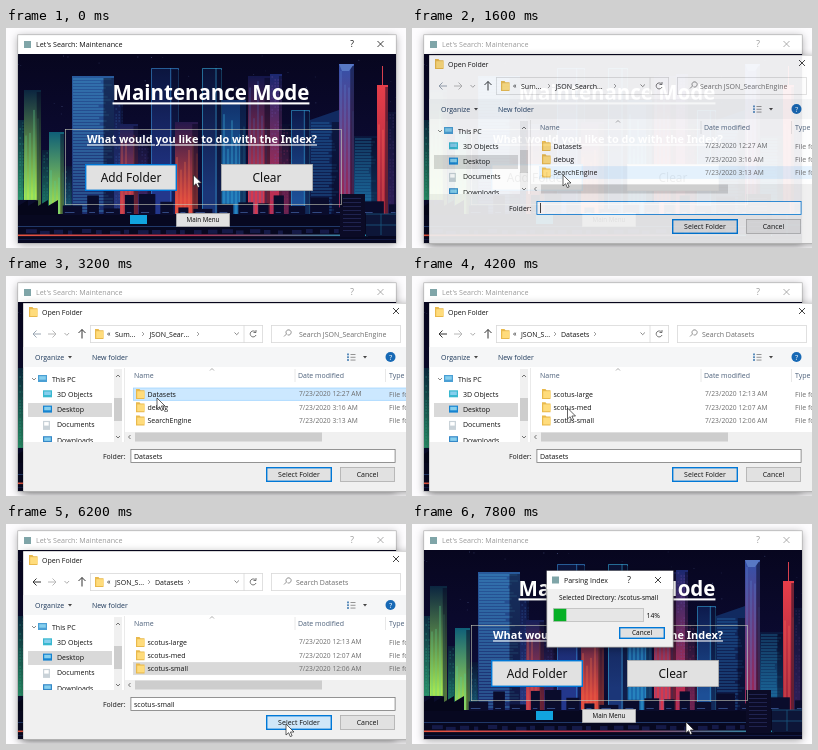
An HTML page for the animation above (8000 ms loop, 400 by 220 pixels).

```html
<!DOCTYPE html>
<html lang="en">
<head>
<meta charset="utf-8">
<title>Index maintenance</title>
<style>
  html, body { margin: 0; width: 100%; height: 100%; overflow: hidden; background: #fdfcfe; }
  svg { display: block; width: 100vw; height: 100vh; }
  text { font-family: "Open Sans", sans-serif; white-space: pre; }
  .form { font-family: "Noto Sans", sans-serif; }
  .head { font-weight: 700; text-decoration: underline; }
  .mid { text-anchor: middle; }
</style>
</head>
<body>
<svg id="stage" viewBox="0 0 400 220">
  <defs>
    <filter id="shadow" x="-10%" y="-10%" width="120%" height="125%">
      <feDropShadow dx="0" dy="1.5" stdDeviation="4" flood-opacity=".35"/>
    </filter>
    <clipPath id="client"><rect x="12" y="26" width="378" height="189"/></clipPath>
    <linearGradient id="sky" x2="0" y2="1">
      <stop stop-color="#07061f"/><stop offset=".7" stop-color="#0d0c38"/><stop offset="1" stop-color="#060719"/>
    </linearGradient>
    <linearGradient id="street">
      <stop stop-color="#e8553f"/><stop offset=".5" stop-color="#b23355"/><stop offset="1" stop-color="#1f8fae"/>
    </linearGradient>
  </defs>
</svg>
<script>
const LOOP = 8000, STEP = 200;
const stage = document.getElementById('stage');
const BLUE = '#0078d7', INK = '#111', GREY = '#999', LINE = '#d9d9d9';

function el(parent, tag, attrs = {}, content) {
  const node = document.createElementNS('http://www.w3.org/2000/svg', tag);
  for (const key in attrs) node.setAttribute(key, attrs[key]);
  if (content !== undefined) node.textContent = content;
  return parent.appendChild(node);
}
const group = (parent, attrs) => el(parent, 'g', attrs);
const rect = (parent, x, y, width, height, fill, attrs) =>
  el(parent, 'rect', { x, y, width, height, fill, ...attrs });
const box = (parent, x, y, w, h, fill, stroke, weight = 1) =>
  rect(parent, x + weight / 2, y + weight / 2, w - weight, h - weight, fill, { stroke, 'stroke-width': weight });
const path = (parent, d, stroke, weight = 0.8, fill = 'none') =>
  el(parent, 'path', { d, stroke, fill, 'stroke-width': weight });
// y is the middle of the line of text
const label = (parent, x, y, str, size = 7, fill = INK, cls = '') =>
  el(parent, 'text', { x, y: y + size * 0.36, 'font-size': size, fill, class: cls }, str);
const cross = (parent, x, y, color = INK) =>
  path(parent, `M${x - 3} ${y - 3}l6 6m0-6l-6 6`, color, 0.8);
const chevron = (parent, x, y, color = '#777') =>
  path(parent, `M${x - 1} ${y - 2}l2 2-2 2`, color, 0.7);
const show = (node, on) => node.setAttribute('opacity', +on);

function random(seed) {
  return () => (seed = (seed * 16807) % 2147483647) / 2147483647;
}

function gradient(id, top, bottom) {
  const grad = el(stage.querySelector('defs'), 'linearGradient', { id, x2: 0, y2: 1 });
  el(grad, 'stop', { 'stop-color': top });
  el(grad, 'stop', { offset: 0.85, 'stop-color': bottom });
  return `url(#${id})`;
}

// x, top, width, colour at the top, colour at the base, trim colour, facade
const TOWERS = [
  [12, 92, 7, '#0b2a40', '#2a8f68', '#2fae8e', 'dots'],
  [36, 122, 9, '#0b1c38', '#1a6e60', '#258a7c', 'dots'],
  [18, 62, 17, '#0b2540', '#a4e552', '#5fd08a', 'bars'],
  [43, 104, 15, '#0f5f78', '#9ad650', '#4fd0a0', 'bars'],
  [58, 138, 10, '#0b1434', '#16506a', '#1f7488', 'dots'],
  [66, 48, 42, '#285a9c', '#1c2f70', '#4aa8d8', 'lines'],
  [108, 75, 9, '#101a4a', '#26347a', '#3460a8', 'dots'],
  [131, 106, 14, '#0b0f32', '#412565', '#3a3c86', 'dots'],
  [114, 96, 18, '#161f58', '#c73c4c', '#e0664c', 'bars'],
  [145, 40, 28, '#0b153e', '#23378c', '#3a8fd2', 'edge'],
  [169, 94, 23, '#25184c', '#dc473e', '#f07048', 'bars'],
  [196, 40, 20, '#0a1236', '#1b3678', '#38acd8', 'edge'],
  [216, 72, 24, '#11306a', '#1c6cae', '#42bfe4', 'bars'],
  [242, 48, 22, '#13164a', '#d5384e', '#4660ac', 'bars'],
  [264, 46, 12, '#1b2870', '#bb2e52', '#6a4aa0', 'dots'],
  [276, 96, 9, '#090e2e', '#6a2250', '#8c2c56', 'dots'],
  [285, 82, 19, '#0d1a4c', '#1d4f96', '#34a0d0', 'edge'],
  [304, 92, 29, '#112a60', '#0e1a48', '#2b7cc0', 'lines'],
  [333, 36, 15, '#3452aa', '#96285a', '#5c80d0', 'bars'],
  [348, 108, 23, '#0b163c', '#175a8e', '#2382b0', 'lines'],
  [371, 57, 11, '#e63e4a', '#a8283e', '#ff6c5c', 'bars'],
  [382, 84, 8, '#0d1234', '#2c1e56', '#44306e', 'dots'],
];
const BASE = 186;

function facade(kind, x, y, w, rnd) {
  if (kind === 'edge') return `M${x + 0.5} ${BASE}V${y + 0.5}H${x + w - 0.5}V${BASE}M${x + w * 0.7} ${y}V${BASE}`;
  let d = '';
  if (kind === 'bars') {
    for (let col = x + 2; col < x + w; col += 4) d += `M${col} ${y + 2 + rnd() * 50}V${BASE}`;
    return d;
  }
  for (let row = y + 3; row < BASE; row += 3) {
    if (kind === 'lines') d += `M${x + 1} ${row}h${w * (0.6 + rnd() * 0.35)}`;
    else for (let col = x + 1.5; col < x + w - 1; col += 3) if (rnd() < 0.6) d += `M${col} ${row}h1.4`;
  }
  return d;
}

function drawCity(parent) {
  const city = group(parent, { 'clip-path': 'url(#client)' });
  const rnd = random(77);
  rect(city, 12, 26, 378, 189, 'url(#sky)');
  for (let i = 0; i < 50; i++)
    rect(city, 12 + rnd() * 378, 27 + rnd() * 70, 0.8, 0.8, '#6f86c0', { opacity: 0.2 + rnd() * 0.5 });

  TOWERS.forEach(([x, y, w, top, base, trim, kind], i) => {
    rect(city, x, y, w, BASE - y, gradient('tower' + i, top, base));
    path(city, facade(kind, x, y, w, rnd), trim, 0.9).setAttribute('opacity', 0.65);
    rect(city, x + w * 0.75, y + 2, w * 0.25, BASE - y, '#060720', { opacity: 0.5 });
  });

  // beacon on the red tower and the slanted roof
  rect(city, 376, 38, 1, 19, '#d8404e');
  path(city, 'M304 92l29-10v10Z', 'none', 0, '#112a60');
  path(city, 'M333 36h15l-5 7h-7Z', 'none', 0, '#5878c4');

  // dark roofs, factory and street
  for (let x = 12; x < 390;) {
    const w = 9 + rnd() * 18;
    rect(city, x, 166 + rnd() * 16, w, 40, '#0a0c2c');
    rect(city, x + 2, 184, w * 0.5, 0.9, '#36508c');
    x += w + 5;
  }
  path(city, 'M12 190V178l10-6v6l10-6v6l10-6v6l10-6V190Z', 'none', 0, '#05061a');
  rect(city, 12, 187, 378, 28, '#070820');
  rect(city, 124, 187, 17, 9, '#11a4df');
  rect(city, 12, 198, 322, 0.8, '#28457c');
  for (let x = 20; x < 330; x += 14) rect(city, x, 201 + rnd() * 2, 4 + rnd() * 7, 4, '#151a48');
  rect(city, 12, 206.5, 350, 1.6, 'url(#street)');
  rect(city, 12, 211, 378, 0.8, '#17204e');
  rect(city, 334, 166, 25, 43, '#0b0b26');
  for (let y = 170; y < 204; y += 4) rect(city, 337, y, 18, 1, '#1f234f');
  rect(city, 360, 186, 30, 22, '#0d1638');
  path(city, 'M360 186h30M360 197h30M375 186v21', '#1b5a80', 0.8);
}

function button(parent, x, y, w, h, str, size, cls = '', focus = false) {
  const face = box(parent, x, y, w, h, '#e1e1e1', focus ? BLUE : '#adadad', focus ? 1.4 : 0.8);
  label(parent, x + w / 2, y + h / 2, str, size, INK, cls + ' mid');
  return face;
}

function appIcon(parent, x, y) {
  rect(parent, x, y, 7, 7, '#7fa5a8');
}

const main = group(stage);
rect(main, 12, 7, 378, 208, '#fff', { filter: 'url(#shadow)' });
box(main, 11.5, 6.5, 379, 209, 'none', '#aaa', 0.6);
appIcon(main, 18, 13);
const mainTitle = label(main, 30, 16, "Let's Search: Maintenance", 7.15);
const mainHelp = label(main, 346, 16, '?', 8.5, INK, 'mid');
const mainClose = cross(main, 374.5, 16);
drawCity(main);
label(main, 205, 65, 'Maintenance Mode', 20.5, '#fff', 'form head mid');
box(main, 59, 101, 277, 76, 'none', '#c9ccb9', 0.6);
label(main, 196, 111.5, 'What would you like to do with the Index?', 10.95, '#fff', 'form head mid');
const addFace = button(main, 79, 136, 92, 27, 'Add Folder', 11.9, 'form', true);
button(main, 215, 136, 92, 27, 'Clear', 11.9, 'form');
button(main, 170, 185, 54, 14, 'Main Menu', 6.2, 'form');

function folderIcon(parent, x, y) {
  path(parent, `M${x} ${y - 5}h3.5l1 1.2h4v8.8h-8.5Z`, 'none', 0, '#e9b94c');
  rect(parent, x + 1.2, y - 2.8, 7.3, 6.8, '#ffdc7c');
}

const picker = group(stage);
rect(picker, 17, 27, 400, 189, '#f0f0f0', { filter: 'url(#shadow)' });
box(picker, 17, 27, 400, 189, '#f0f0f0', '#999', 0.7);
rect(picker, 17.5, 27.5, 390, 64, '#fff');
rect(picker, 17.5, 71, 390, 20, '#f5f6f7');
rect(picker, 17.5, 91, 390, 75, '#fff');
folderIcon(picker, 23, 36);
label(picker, 36, 36, 'Open Folder', 7);
cross(picker, 390, 35);

const backArrow = path(picker, 'M35 58h-8m3.5-3.5L27 58l3.5 3.5', '#9aa6b2', 1);
path(picker, 'M42 58h8m-3.5-3.5L50 58l-3.5 3.5', '#b8b8b8', 1);
path(picker, 'M58.5 57l2.3 2.3 2.3-2.3', '#888', 0.7);
path(picker, 'M76 62.5v-9m-3.5 3.5l3.5-3.5 3.5 3.5', '#333', 1);
box(picker, 84, 49, 173, 18, '#fff', LINE, 0.8);
path(picker, 'M238 49v18', LINE, 0.8);
path(picker, 'M228.5 56.5l2.2 2.2 2.2-2.2', '#555', 0.7);
path(picker, 'M249.5 56a3 3 0 1 0 .5 3m0-5v2.5h-2.5', '#555', 0.8);
folderIcon(picker, 89, 58);
label(picker, 101, 57.5, '«', 7);
box(picker, 265, 49, 130, 18, '#fff', LINE, 0.8);
path(picker, 'M278 60.5l2.5-2.5a2.6 2.6 0 1 1 1 .8', '#777', 0.8);

label(picker, 29, 81, 'Organize', 7, '#1e395b');
path(picker, 'M62 80h4l-2 2.4Z', 'none', 0, '#444');
label(picker, 86, 81, 'New folder', 7, '#1e395b');
for (let i = 0; i < 3; i++) {
  rect(picker, 341, 77.5 + i * 2.8, 2, 1.8, '#5b8dbb');
  rect(picker, 344.5, 78 + i * 2.8, 5, 0.9, '#888');
}
path(picker, 'M357 80h4l-2 2.4Z', 'none', 0, '#444');
el(picker, 'circle', { cx: 384.5, cy: 81, r: 5, fill: '#1769b5' });
label(picker, 384.5, 81, '?', 7.5, '#fff', 'mid');

rect(picker, 22, 127, 84, 14, LINE);
path(picker, 'M26 102l2 2 2-2', '#555', 0.7);
['This PC', '3D Objects', 'Desktop', 'Documents', 'Downloads'].forEach((name, i) => {
  const y = 103 + i * 15.3, x = i ? 37 : 32;
  rect(picker, x, y - 4, i === 3 ? 7 : 9, i === 3 ? 9 : 7, ['#4a9fd4', '#39b8cf', '#1683d0', '#c9d2d8', '#3488c8'][i]);
  rect(picker, x + 1.2, y - 2.8, i === 3 ? 4.5 : 6.6, 3.5, i === 3 ? '#fff' : '#86cfee');
  label(picker, i ? 51 : 46, y, name);
});
rect(picker, 108, 93, 8, 73, '#f0f0f0');
rect(picker, 108, 122, 8, 23, '#cdcdcd');
path(picker, 'M110 101l2-2 2 2M110 160l2 2 2-2', '#555', 0.8);
path(picker, 'M118.5 92v74', '#e5e5e5', 0.8);

label(picker, 128, 99, 'Name', 7, '#4c607a');
path(picker, 'M204 94.5l2-2 2 2', '#777', 0.6);
label(picker, 292, 99, 'Date modified', 6.95, '#4c607a');
label(picker, 383, 99, 'Type', 7, '#4c607a');
path(picker, 'M289 93v13M379.5 93v13', '#e2e2e2', 0.8);
const rowMark = box(picker, 127, 112, 280, 13, '#cce8ff', '#99d1ff', 0.7);

function listing(parent, crumbs, search, rows) {
  const view = group(parent);
  crumbs.forEach(([x, str, arrow]) => {
    label(view, x, 58, str);
    chevron(view, arrow, 58);
  });
  label(view, search[0], 58, 'Search ' + search[1], 7, '#6d6d6d');
  rows.forEach(([name, time], i) => {
    const y = 118 + i * 13.2;
    folderIcon(view, 130, y);
    label(view, 141.5, y, name);
    label(view, 293, y, `7/23/2020 ${time} AM`, 6.7, '#6d6d6d');
    label(view, 383, y, 'File folder', 7, '#6d6d6d');
  });
  return view;
}
const ROOT_ROWS = [['Datasets', '12:27'], ['debug', '3:16'], ['SearchEngine', '3:13']];
const views = {
  opening: listing(picker, [[109, 'Sum...', 137], [143.5, 'JSON_Search...', 203]], [288, 'JSON_SearchEngine'], ROOT_ROWS),
  root: listing(picker, [[109, 'Sum...', 137], [143.5, 'JSON_Sear...', 192]], [293, 'JSON_SearchEngine'], ROOT_ROWS),
  datasets: listing(picker, [[109, 'JSON_S...', 143], [149, 'Datasets', 183]], [290, 'Datasets'],
    [['scotus-large', '12:13'], ['scotus-med', '12:07'], ['scotus-small', '12:06']]),
};

rect(picker, 119, 156, 290, 10, '#f0f0f0');
rect(picker, 129, 156.5, 187, 9, '#cdcdcd');
path(picker, 'M124.5 159l-2 2 2 2', '#555', 0.8);
rect(picker, 17.5, 166, 390, 49, '#f0f0f0');
label(picker, 97, 180, 'Folder:');
const field = box(picker, 124.5, 173, 265, 14, '#fff', '#7a7a7a', 0.8);
const fieldText = label(picker, 128, 180, '');
const caret = rect(picker, 128, 175, 0.8, 10, '#111');
const selectFace = button(picker, 260, 191, 66, 15, 'Select Folder', 7, '', true);
button(picker, 334, 191, 55, 15, 'Cancel', 7);

const parsing = group(stage);
rect(parsing, 135, 47, 126, 76, '#f0f0f0', { filter: 'url(#shadow)' });
box(parsing, 134.5, 46.5, 127, 77, '#f0f0f0', '#888', 0.7);
rect(parsing, 135, 47, 126, 18, '#fff');
appIcon(parsing, 140, 52.5);
label(parsing, 152, 56, 'Parsing Index');
label(parsing, 217, 56, '?', 8.5, INK, 'mid');
cross(parsing, 246, 56);
label(parsing, 196.5, 74, 'Selected Directory: /scotus-small', 6.5, INK, 'form mid');
box(parsing, 141, 84, 91, 14, '#e6e6e6', '#bcbcbc', 0.8);
const bar = rect(parsing, 141.8, 84.8, 0, 12.4, '#06b025');
const percent = label(parsing, 234.5, 91.5, '', 6.8, INK, 'form');
button(parsing, 207, 103, 46, 12, 'Cancel', 6.5, 'form', true);

const cursor = path(stage, 'M0 0V11L2.6 8.7 4.3 12.6 6.1 11.8 4.4 8H8Z', '#222', 0.7, '#fff');

// time, x, y of the pointer tip
const POINTER = [
  [0, 187.5, 147], [800, 152, 149], [1400, 151, 147], [2200, 151, 147], [2800, 151, 122],
  [3800, 151, 122], [4600, 160, 142], [5400, 160, 142], [6000, 280, 200], [6600, 280, 200], [7200, 274, 198],
];
const PICKER_FADE = [[0, 0], [1400, 0.5], [1600, 0.93], [1800, 1], [6400, 0.3], [6600, 0]];
const PARSING_FADE = [[0, 0], [7000, 0.5], [7200, 1]];
const PROGRESS = [[0, 10], [7600, 12], [7800, 14]];
// time, fill, outline, row
const MARKS = [
  [0, '#e5f3ff', '#e5f3ff', 2], [2400, '#e5f3ff', '#e5f3ff', 1], [2800, '#e5f3ff', '#e5f3ff', 0],
  [3000, '#cce8ff', '#99d1ff', 0], [3600, 'none', 'none', 0],
  [5200, '#cce8ff', '#99d1ff', 2], [6200, '#d9d9d9', '#d9d9d9', 2],
];
const FIELD = [[0, ''], [3000, 'Datasets'], [5200, 'scotus-small']];

const current = (table, t) => table.findLast(row => row[0] <= t);

function pointerAt(t) {
  const from = current(POINTER, t), to = POINTER.find(row => row[0] > t) || from;
  const p = to === from ? 0 : (t - from[0]) / (to[0] - from[0]);
  const ease = p * p * (3 - 2 * p);
  return [from[1] + (to[1] - from[1]) * ease, from[2] + (to[2] - from[2]) * ease];
}

function render(t) {
  const inactive = (t >= 1200 && t < 6600) || t >= 7000;
  mainTitle.setAttribute('fill', inactive ? GREY : INK);
  mainHelp.setAttribute('fill', inactive ? GREY : INK);
  mainClose.setAttribute('stroke', inactive ? GREY : INK);
  addFace.setAttribute('fill', t === 1000 ? '#cce4f7' : t >= 600 && t < 1400 ? '#e5f1fb' : '#e1e1e1');

  picker.setAttribute('opacity', current(PICKER_FADE, t)[1]);
  show(views.opening, t < 1800);
  show(views.root, t >= 1800 && t < 3600);
  show(views.datasets, t >= 3600);
  backArrow.setAttribute('stroke', t < 3600 ? '#9aa6b2' : '#333');
  const [, fill, outline, row] = current(MARKS, t);
  rowMark.setAttribute('fill', fill);
  rowMark.setAttribute('stroke', outline);
  rowMark.setAttribute('y', 112 + row * 13.2);
  fieldText.textContent = current(FIELD, t)[1];
  field.setAttribute('stroke', t < 3000 ? BLUE : '#7a7a7a');
  show(caret, t < 3000 && t % 1000 >= 400);
  selectFace.setAttribute('fill', t >= 6000 ? '#cfe6f8' : '#e1e1e1');

  parsing.setAttribute('opacity', current(PARSING_FADE, t)[1]);
  const done = current(PROGRESS, t)[1];
  bar.setAttribute('width', 89.4 * done / 100);
  percent.textContent = done + '%';

  cursor.setAttribute('transform', `translate(${pointerAt(t)})`);
}

const start = performance.now();
function tick() {
  const t = (performance.now() - start) % LOOP;
  render(Math.floor(t / STEP) * STEP);
  requestAnimationFrame(tick);
}
tick();
</script>
</body>
</html>
```
